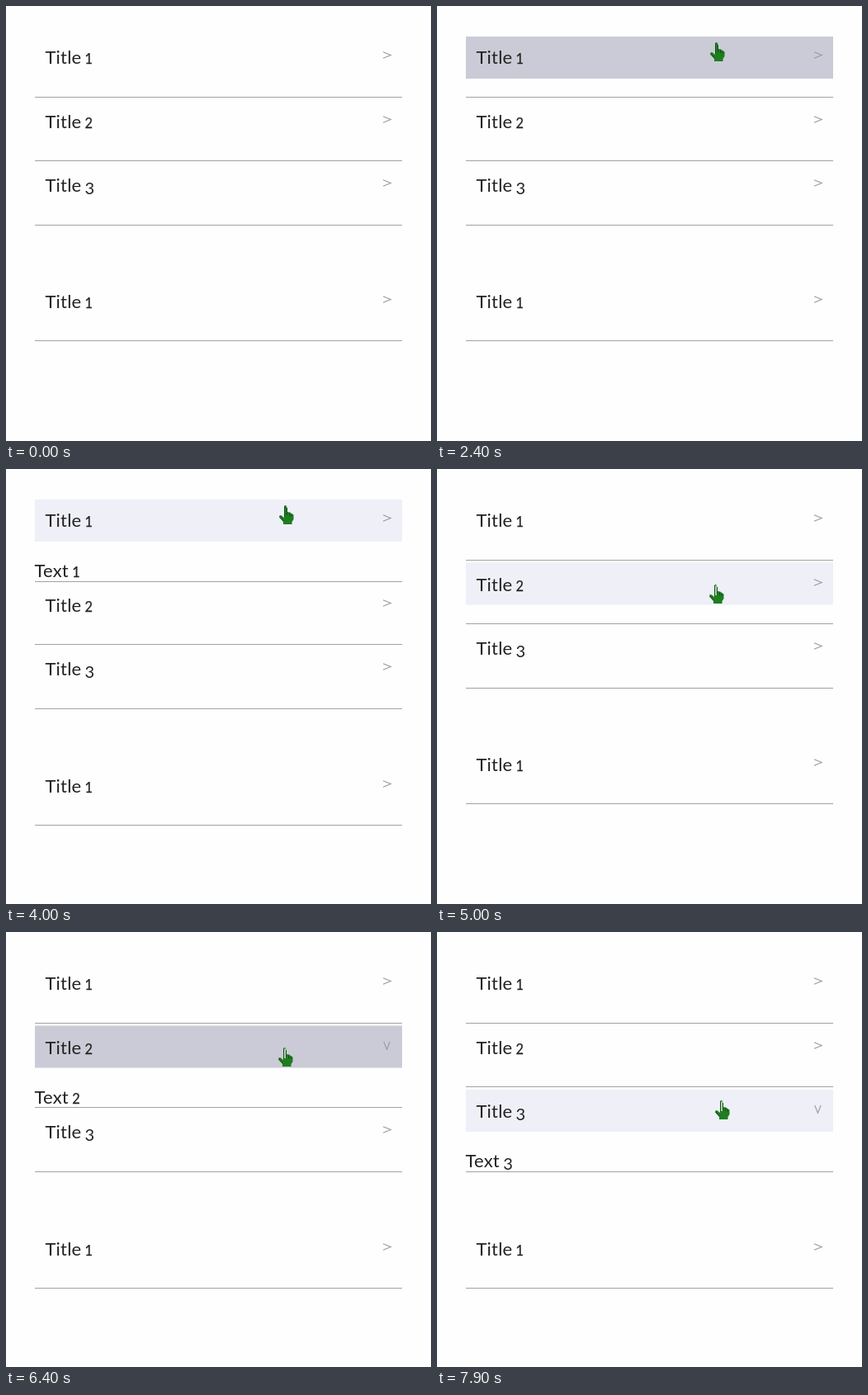
An HTML page for the animation above (8000 ms loop, 515 px wide and 527 px high).

```html
<!DOCTYPE html>
<html lang="en">
<head>
<meta charset="utf-8">
<title>Accordion</title>
<style>
  html, body { margin: 0; width: 100%; height: 100%; overflow: hidden; background: #fefefe; }
  svg { display: block; }
  text { font: 22px Lato, sans-serif; letter-spacing: .2px; fill: #222; }
  .small { font-size: 16.3px; stroke: #222; stroke-width: .25; }
  .deep { font-size: 20px; }
  .arrow { fill: none; stroke: #999; stroke-width: 1.1; }
  .line { fill: #a2a2a2; }
</style>
</head>
<body>
<svg id="stage" width="515" height="527" viewBox="0 0 515 527">
  <g id="list"></g>
  <g id="hand">
    <path fill="#1f7d20" d="M-2 1Q-.5 -1 1 1L2 8L5 8.5L9.5 11.5V17L7.5 20V23H-3V20L-8 14.5Q-8 11 -5 12.5L-2 15Z"/>
    <path id="finger" d="M-.8 1.5H.8V13H-.8Z"/>
    <path fill="none" stroke="#164f17" d="M-1.5 14V1.5M1.5 3V12M4.5 9.5V13M7 11V14M-7 14L-2.5 19.5"/>
  </g>
</svg>
<script>
const LOOP = 8000, STEP = 100, OPEN = 25.6, BAR = 51;
const IDLE = '#fefefe', HOVER = '#efeff8', ACTIVE = '#cbcbd7';

// top of bar, title baseline, closed separator, then press times (open, close)
const rows = [
  { n: 1, bar: 37, base: 70, line: 110.5, presses: [2400, 3700] },
  { n: 2, bar: 113.5, base: 148, line: 187.2, presses: [5200, 6400] },
  { n: 3, bar: 191, base: 225, line: 265, presses: [7500] },
  { n: 1, bar: 333, base: 366.5, line: 405.6, presses: [] }
];

// time, x, y of the fingertip
const path = [
  [700, 366, 510], [1200, 352, 100], [1400, 349, 61], [1500, 348, 58],
  [1900, 339, 44], [4500, 339, 44], [5000, 338, 140], [6800, 338, 140], [7300, 345, 204]
];

const $ = id => document.getElementById(id);
const ramp = (t, from, to) => Math.min(1, Math.max(0, (t - from) / (to - from)));

// old-style figures: 1 and 2 at x-height, 3 below the baseline
function label(word, n, x, gap) {
  const deep = n === 3;
  return `<text x="${x}">${word}</text>
    <text class="${deep ? 'deep' : 'small'}" x="${x + gap}" y="${deep ? 3 : 0}">${n}</text>`;
}

$('list').innerHTML = rows.map((r, i) => `<g class="row">
  <rect class="bar" x="35" width="445" height="${BAR}"/>
  <g class="title">${label('Title', r.n, 47.5, 48)}
    <path class="arrow" d="M-4.5 -3.7L4.7 0L-4.5 3.7"/></g>
  <clipPath id="clip${i}"><rect x="30" width="450"/></clipPath>
  <g clip-path="url(#clip${i})"><g class="panel">${label('Text', r.n, 34.5, 45.7)}</g></g>
  <rect class="line" x="35" width="445" height="1"/>
</g>`).join('');

document.querySelectorAll('.row').forEach((group, i) => {
  const find = s => group.querySelector(s);
  rows[i].el = {
    bar: find('.bar'), title: find('.title'), arrow: find('.arrow'),
    clip: find('clipPath rect'), panel: find('.panel'), line: find('.line')
  };
});

function pointer(t) {
  const i = path.findIndex(p => p[0] > t);
  if (i < 0) return path[path.length - 1].slice(1);
  const [t0, x0, y0] = path[Math.max(0, i - 1)], [t1, x1, y1] = path[i];
  const k = ramp(t, t0, t1);
  return [x0 + (x1 - x0) * k, y0 + (y1 - y0) * k];
}

const moveTo = (el, y) => el.setAttribute('transform', `translate(0 ${Math.floor(y)})`);

function draw(t) {
  const [x, y] = pointer(t), visible = t >= path[0][0];
  $('hand').setAttribute('transform', `translate(${Math.round(x)} ${Math.round(y)})`);
  $('hand').style.display = visible ? '' : 'none';
  $('finger').style.fill = y < 50 ? '#1f7d20' : '#d8e5d8';

  let shift = 0;
  for (const { bar, base, line, presses, el } of rows) {
    const [open = Infinity, close = Infinity] = presses;
    // the panel collapses a moment after the second click
    const shown = open < LOOP ? ramp(t, open, open + 200) : 0;
    const hidden = close < LOOP ? ramp(t, close + 400, close + 600) : 0;
    const height = OPEN * (shown - hidden);
    const turned = t > open && t <= close;
    const top = bar + shift;
    const hover = visible && y >= top && y < top + BAR;

    el.bar.setAttribute('y', top);
    el.bar.style.fill = presses.includes(t) ? ACTIVE : hover ? HOVER : IDLE;
    moveTo(el.title, base + shift);
    el.arrow.setAttribute('transform', `translate(461.5 -10.5) rotate(${turned ? 90 : 0})`);
    el.clip.setAttribute('y', line + shift);
    el.clip.setAttribute('height', height);
    moveTo(el.panel, line + shift + 20.8);
    el.line.setAttribute('y', Math.floor(line + shift + height));
    shift += height;
  }
}

function tick() {
  draw(Math.floor(performance.now() % LOOP / STEP) * STEP);
  requestAnimationFrame(tick);
}
tick();
</script>
</body>
</html>
```
